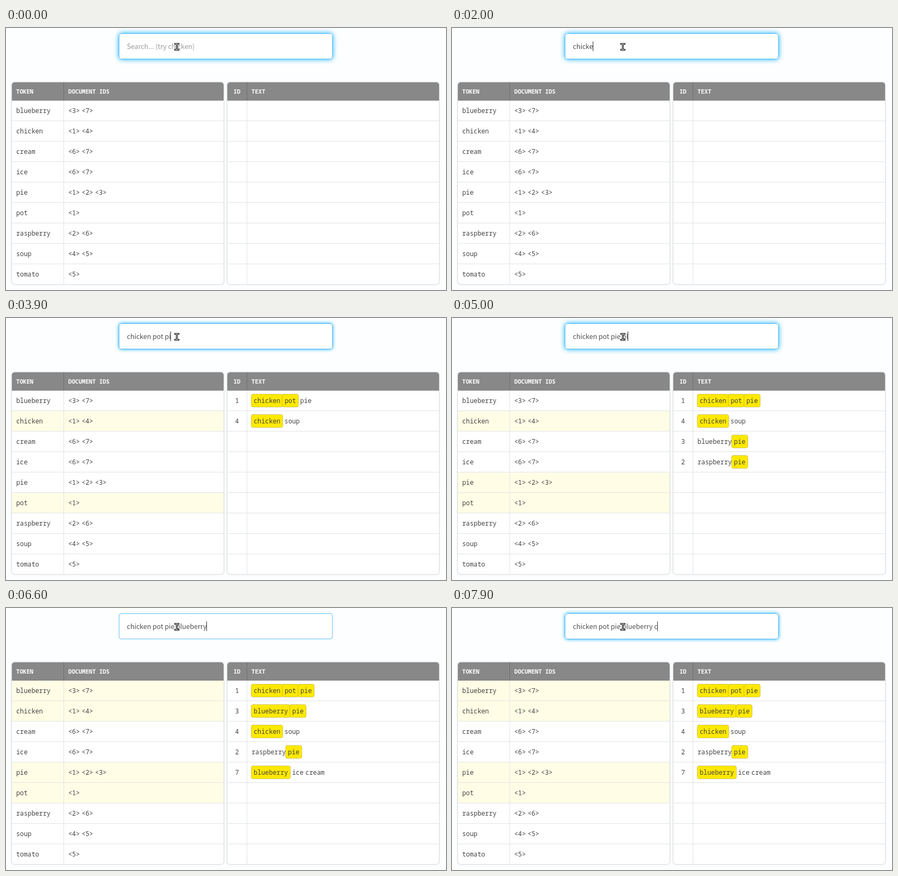
Animation, 819 px wide and 487 px high, one loop 8000 ms. Source, as an HTML page with a canvas:

```html
<!DOCTYPE html>
<html lang="en">
<head>
<meta charset="utf-8">
<title>Token index search</title>
<style>
html, body { margin: 0; width: 100%; height: 100%; overflow: hidden; background: #fcfeff; }
canvas { display: block; }
</style>
</head>
<body>
<canvas id="stage" width="819" height="487"></canvas>
<script>
const ctx = document.getElementById('stage').getContext('2d');
const LOOP = 8000;
const MONO = '"Noto Sans Mono", "DejaVu Sans Mono", monospace';
const BODY = '11.83px ' + MONO;
const HEAD = 'bold 10.67px ' + MONO;
// CJK families carry the humanist Latin used in the search box
const INPUT = '12.53px "Noto Sans CJK JP", "Noto Sans CJK SC", "Noto Sans CJK", "Open Sans", sans-serif';
const TOP = 101, ROWS_TOP = 135, PITCH = 38, BOTTOM = 476, SPACE = 3.6;

const docs = {
  1: 'chicken pot pie',
  2: 'raspberry pie',
  3: 'blueberry pie',
  4: 'chicken soup',
  7: 'blueberry ice cream'
};

const index = [
  ['blueberry', '<3> <7>'],
  ['chicken', '<1> <4>'],
  ['cream', '<6> <7>'],
  ['ice', '<6> <7>'],
  ['pie', '<1> <2> <3>'],
  ['pot', '<1>'],
  ['raspberry', '<2> <6>'],
  ['soup', '<4> <5>'],
  ['tomato', '<5>']
];

const query = 'chicken pot pie blueberry c';
const keyTimes = [
  900, 1150, 1350, 1550, 1750, 1950, 2200, 2500, 2750, 3000, 3250, 3450, 3650, 3850,
  4100, 4500, 4700, 4900, 5200, 5400, 5600, 5800, 5950, 6100, 6300, 7100, 7600
];

// when results change: time, matched tokens, ranked documents
const stages = [
  [0, [], []],
  [2200, ['chicken'], [4, 1]],
  [3250, ['chicken', 'pot'], [1, 4]],
  [4100, ['chicken', 'pot', 'pie'], [1, 4, 3, 2]],
  [6300, ['chicken', 'pot', 'pie', 'blueberry'], [1, 4, 3, 2, 7]],
  [6400, ['chicken', 'pot', 'pie', 'blueberry'], [1, 3, 4, 2, 7]]
];

function box(x, y, w, h, r) {
  ctx.beginPath();
  ctx.roundRect(x, y, w, h, r);
}

function rect(x, y, w, h, color) {
  ctx.fillStyle = color;
  ctx.fillRect(x, y, w, h);
}

function text(str, x, y, font, color, align = 'left') {
  ctx.font = font;
  ctx.fillStyle = color;
  ctx.textAlign = align;
  ctx.fillText(str, x, y);
}

function glowFill(color, blur, fill) {
  ctx.save();
  ctx.shadowColor = color;
  ctx.shadowBlur = blur;
  ctx.fillStyle = fill;
  ctx.fill();
  ctx.restore();
}

const baseline = row => 158 + row * PITCH;

function drawTable(x, split, litRows) {
  const w = 394;
  box(x, TOP, w, BOTTOM - TOP, 5);
  glowFill('rgba(0,0,0,.35)', 3, '#fff');
  ctx.save();
  ctx.clip();
  rect(x, TOP, w, ROWS_TOP - TOP, '#888');
  for (const row of litRows) rect(x, ROWS_TOP + row * PITCH, w, PITCH - 1, '#fffde5');
  for (let row = 1; row < index.length; row++) rect(x, ROWS_TOP - 1 + row * PITCH, w, 1, '#e1e3e6');
  rect(split, ROWS_TOP, 1, BOTTOM - ROWS_TOP, '#e1e3e6');
  for (let y = TOP; y < ROWS_TOP; y += 2) rect(split, y, 1, 1, '#555');
  ctx.restore();
}

function drawWords(str, x, y) {
  ctx.font = BODY;
  for (const word of str.split(' ')) {
    text(word, x, y, BODY, '#444');
    x += ctx.measureText(word).width + SPACE;
  }
}

function drawResult(str, hits, row) {
  const y = baseline(row);
  let x = 457, gap = 0;
  for (const word of str.split(' ')) {
    ctx.font = BODY;
    const w = ctx.measureText(word).width;
    if (hits.includes(word)) {
      box(x - 0.5, y - 16.5, w + 9, 24, 3.5);
      ctx.fillStyle = '#ffe900';
      ctx.fill();
      ctx.strokeStyle = 'rgba(120,110,40,.32)';
      ctx.lineWidth = 1;
      ctx.stroke();
      text(word, x + 4, y, BODY, '#444');
      x += w + 8;
    } else {
      x += gap;
      text(word, x, y, BODY, '#444');
      x += w;
    }
    gap = SPACE;
  }
}

function drawSearch(t) {
  const glow = (1 - Math.cos((t - 600) / 1000 * 2 * Math.PI)) / 2;
  box(210, 10, 398, 48, 5);
  glowFill('#00aaff', 10 * glow, '#fff');
  box(210.5, 10.5, 397, 47, 4.5);
  ctx.strokeStyle = '#62bff3';
  ctx.lineWidth = 1;
  ctx.stroke();

  const count = keyTimes.filter(k => k <= t).length;
  const typed = query.slice(0, count);
  if (count) text(typed, 225, 39, INPUT, '#505050');
  else text('Search... (try chicken)', 225, 39, INPUT, '#9a9a9a');

  const lastKey = count ? keyTimes[count - 1] : -700;
  if ((t - lastKey) % 1000 < 500) {
    ctx.font = INPUT;
    const x = 225 + Math.floor(ctx.measureText(typed).width);
    rect(x, 25, 1, 18, '#333');
  }
}

function drawPointer() {
  ctx.beginPath();
  ctx.moveTo(315, 29.5);
  ctx.lineTo(321, 29.5);
  ctx.moveTo(318, 29.5);
  ctx.lineTo(318, 40.5);
  ctx.moveTo(315, 40.5);
  ctx.lineTo(321, 40.5);
  ctx.lineCap = 'square';
  for (const [width, color] of [[3.2, '#000'], [1, '#fff']]) {
    ctx.lineWidth = width;
    ctx.strokeStyle = color;
    ctx.stroke();
  }
}

function render(t) {
  const [, hits, order] = stages.filter(s => s[0] <= t).pop();
  rect(0, 0, 819, 487, '#fcfeff');

  const lit = index.map((entry, row) => hits.includes(entry[0]) ? row : -1).filter(row => row >= 0);
  drawTable(11, 107, lit);
  drawTable(412, 448, []);
  text('TOKEN', 19, 122, HEAD, '#fff');
  text('DOCUMENT IDS', 116, 122, HEAD, '#fff');
  text('ID', 430, 122, HEAD, '#fff', 'center');
  text('TEXT', 457, 122, HEAD, '#fff');

  index.forEach(([token, ids], row) => {
    text(token, 19, baseline(row), BODY, '#444');
    drawWords(ids, 116, baseline(row));
  });
  order.forEach((id, row) => {
    text(String(id), 430, baseline(row), BODY, '#444', 'center');
    drawResult(docs[id], hits, row);
  });

  drawSearch(t);
  drawPointer();
}

const start = performance.now();
function tick() {
  render((performance.now() - start) % LOOP);
  requestAnimationFrame(tick);
}
tick();
</script>
</body>
</html>
```
